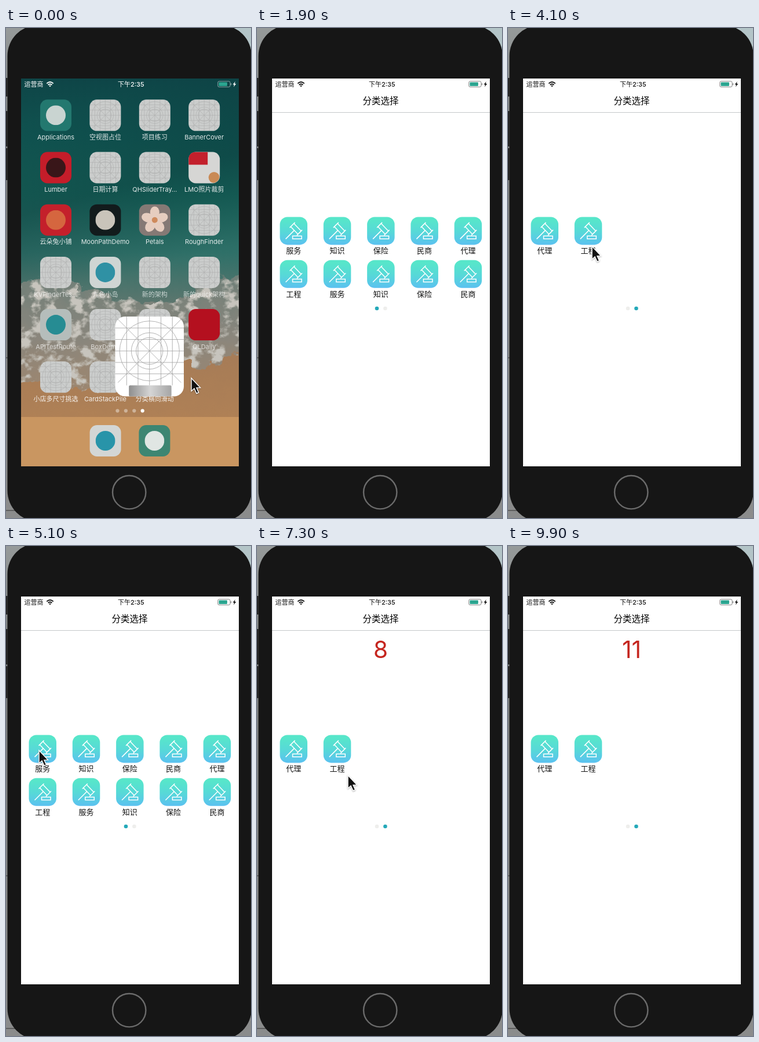
An HTML page for the animation above (10 s loop, 423x844 px).

```html
<!DOCTYPE html>
<html lang="zh">
<head>
<meta charset="utf-8">
<title>分类选择</title>
<style>
html, body { margin: 0; width: 100%; height: 100%; overflow: hidden; background: #161616; }
svg { display: block; width: 100vw; height: 100vh; }
text { font-family: Inter, "Noto Sans CJK SC", "Noto Sans CJK", sans-serif; text-anchor: middle; }
</style>
</head>
<body>
<svg id="stage" viewBox="0 0 423 844">
  <defs>
    <linearGradient id="wall" x2="0" y2="1">
      <stop offset="0" stop-color="#0e4547"/><stop offset=".15" stop-color="#105350"/>
      <stop offset=".3" stop-color="#176259"/><stop offset=".45" stop-color="#2f7068"/>
      <stop offset=".6" stop-color="#63776f"/>
    </linearGradient>
    <linearGradient id="shade" y2="1" x2=".3">
      <stop offset=".2" stop-color="#062c30" stop-opacity="0"/><stop offset=".6" stop-color="#062c30" stop-opacity=".3"/>
      <stop offset="1" stop-color="#062c30" stop-opacity="0"/>
    </linearGradient>
    <linearGradient id="foam" x2="0" y2="1">
      <stop offset="0" stop-color="#6f7f78"/><stop offset=".5" stop-color="#8a867c"/>
      <stop offset="1" stop-color="#a0866d"/>
    </linearGradient>
    <linearGradient id="sand" x2="0" y2="1">
      <stop offset="0" stop-color="#a57b58"/><stop offset="1" stop-color="#b98653"/>
    </linearGradient>
    <linearGradient id="mint" x2="0" y2="1">
      <stop offset=".1" stop-color="#57e6ca"/><stop offset=".55" stop-color="#57d8d8"/>
      <stop offset="1" stop-color="#5bc1f0"/>
    </linearGradient>
    <linearGradient id="metal">
      <stop offset="0" stop-color="#8e8e8e"/><stop offset=".5" stop-color="#d5d5d5"/>
      <stop offset="1" stop-color="#a5a5a5"/>
    </linearGradient>
    <linearGradient id="wallGrey" x2="0" y2="1">
      <stop offset="0" stop-color="#969a9a"/><stop offset=".25" stop-color="#777a7a"/>
      <stop offset=".6" stop-color="#828484"/><stop offset="1" stop-color="#8b8c8c"/>
    </linearGradient>
    <filter id="ragged">
      <feTurbulence type="fractalNoise" baseFrequency=".04" numOctaves="3" seed="4"/>
      <feDisplacementMap in="SourceGraphic" scale="34" xChannelSelector="R" yChannelSelector="G"/>
    </filter>
    <filter id="froth" color-interpolation-filters="sRGB">
      <feTurbulence type="fractalNoise" baseFrequency=".045 .06" numOctaves="5" seed="9" result="noise"/>
      <feColorMatrix values="0 0 0 0 .78  0 0 0 0 .77  0 0 0 0 .74  5 0 0 0 -2.35" result="flecks"/>
      <feDisplacementMap in="SourceGraphic" in2="noise" scale="34" xChannelSelector="R" yChannelSelector="G" result="shape"/>
      <feComposite in="flecks" in2="shape" operator="in"/>
    </filter>
    <clipPath id="screen"><rect x="26" y="87" width="376" height="668"/></clipPath>
    <g id="template" fill="none" stroke="#a2a2a2">
      <circle r=".195"/><circle r=".265"/><circle r=".435"/>
      <path d="M-.5 0H.5M0-.5V.5M-.5-.167H.5M-.5.167H.5M-.167-.5V.5M.167-.5V.5M-.5-.333H.5M-.5.333H.5M-.333-.5V.5M.333-.5V.5M-.46-.46L.46.46M-.46.46L.46-.46"/>
    </g>
    <g id="gavel">
      <rect width="47.5" height="48" rx="13" fill="url(#mint)"/>
      <path d="M10 38L24.5 23.5M17 18.5L26 9.5M29.5 31.5L38.5 22.5M19 17L31 29.5M24.5 11.5L36.5 24M22 32.8h15.5v5H22Z"
        fill="none" stroke="#fff" stroke-width="1.5"/>
    </g>
  </defs>

  <rect width="423" height="844" fill="url(#wallGrey)"/>
  <path d="M380 0H423V45Z" fill="#b3c4c7"/>
  <path d="M0 568H4M0 831H40" stroke="#333"/>
  <path d="M1 86V118M1 143V204M1 207V262" stroke="#202020" stroke-width="3"/>
  <rect x="2.5" y="-5" width="421.5" height="855" rx="53" fill="#161616"/>
  <circle cx="212.7" cy="799.7" r="28.7" fill="none" stroke="#6b6b6b" stroke-width="2.4"/>

  <g clip-path="url(#screen)">
    <g id="home">
      <rect x="26" y="87" width="376" height="668" fill="url(#wall)"/>
      <rect x="26" y="87" width="376" height="360" fill="url(#shade)"/>
      <path id="surf" d="M0 450Q60 420 105 436T190 462T270 470T340 440T430 436V640H0Z" fill="url(#foam)" filter="url(#ragged)"/>
      <use href="#surf" filter="url(#froth)"/>
      <path d="M0 606Q70 612 130 622T235 604T320 580T430 548V800H0Z" fill="url(#sand)" filter="url(#ragged)"/>
      <rect x="26" y="670" width="376" height="85" fill="#c99661"/>
      <g id="tiles"></g>
    </g>
    <g id="launch">
      <rect id="card" fill="#fff"/>
      <g id="cardArt">
        <use id="cardGrid" href="#template" stroke-width=".007"/>
        <rect id="cardBase" fill="url(#metal)"/>
      </g>
    </g>
    <g id="app">
      <rect x="26" y="87" width="376" height="668" fill="#fff"/>
      <g id="content">
        <text x="213.5" y="130.7" font-size="15.5" font-weight="500">分类选择</text>
        <path d="M26 145.5H402" stroke="#c4c8c9"/>
        <text id="count" x="213.5" y="193" font-size="40.5" fill="#c5261f"></text>
        <g id="pages"></g>
        <circle id="dot0" cx="207" cy="483" r="3.3"/>
        <circle id="dot1" cx="221.4" cy="483" r="3.3"/>
      </g>
    </g>
    <g id="status">
      <text x="48" y="100.7" font-size="11">运营商</text>
      <text x="215.8" y="100.5" font-size="11" font-weight="500">下午2:35</text>
      <path d="M70.3 95.6Q76 90.6 81.7 95.6M72.6 98Q76 95.2 79.4 98" fill="none" stroke="currentColor" stroke-width="1.9"/>
      <path d="M74.2 99.4Q76 98 77.8 99.4L76 101.6Z" fill="currentColor"/>
      <rect x="365.7" y="91.8" width="21.3" height="9.8" rx="2.4" fill="none" stroke="currentColor" stroke-opacity=".5"/>
      <rect x="367.4" y="93.4" width="14.5" height="6.6" rx="1" fill="#2ba590"/>
      <path d="M388.4 95.3v3" stroke="currentColor" stroke-opacity=".5" stroke-width="1.4"/>
      <path d="M395.8 92L391.6 97.6H394L393 101.6L397.3 96H394.8Z" fill="currentColor"/>
    </g>
  </g>
  <path id="cursor" d="M0 0V22.5L5 18L9 26.5L12.6 25L9 16.6H15.5Z" fill="#111" stroke="#fff" stroke-width="1.4"
    style="filter:drop-shadow(0 1px 1.2px #0005)"/>
</svg>
<script>
const LOOP = 10000, STEP = 100;
const $ = id => document.getElementById(id);
const set = (id, attrs) => { for (const k in attrs) $(id).setAttribute(k, attrs[k]); };
const label = (x, y, size, text, fill) =>
  `<text x="${x}" y="${y}" font-size="${size}" fill="${fill}">${text}</text>`;

// Tile art, drawn around the centre of the tile.
const disc = fill => `<circle r="17" fill="${fill}"/>`;
const blank = '<use href="#template" transform="scale(54)" stroke-width=".011" opacity=".75"/>';
const photo = '<path d="M-27-27H6V-5H-27Z" fill="#c3202c"/><circle cx="17" cy="17" r="9.5" fill="#c98a55"/>';
const blossom = [0, 72, 144, 216, 288].map(a =>
  `<ellipse cy="-13" rx="8" ry="10.5" fill="#e6cdbf" transform="rotate(${a})"/>`).join('') + '<circle r="5" fill="#cf8a5c"/>';

// Home screen: [label, tile colour, art]; no colour means a blank template.
const apps = [
  ['Applications', '#23786f', disc('#c9d4d1')], ['空视图占位'], ['项目练习'], ['BannerCover'],
  ['Lumber', '#c41d2a', disc('#391619')], ['日期计算'], ['QHSliderTray…'], ['LMO照片裁剪', '#d6d6d4', photo],
  ['云朵兔小铺', '#c4202b', disc('#d5663f')], ['MoonPathDemo', '#121b1c', disc('#c9c4ba')],
  ['Petals', '#857975', blossom], ['RoughFinder'],
  ['KVFinderTes…'], ['九色小岛', '#cfd5d3', disc('#2f91a4')], ['新的架构'], ['新的quick架构'],
  ['APITestRoute', '#b5bdbb', disc('#268c93')], ['BoxDemo'], [''], ['QLDaily', '#b4101f', ''],
  ['小店多尺寸挑选'], ['CardStackPile'], ['分类横向滑动']
];

function tile(x, y, colour = '#cbcdcc', art = blank) {
  return `<g transform="translate(${x + 27} ${y + 27})">
    <rect x="-27" y="-27" width="54" height="54" rx="12.5" fill="${colour}"/>
    <g style="clip-path:inset(0 round 12px)">${art}</g></g>`;
}

function buildHome() {
  let out = '';
  apps.forEach(([name, colour, art], i) => {
    const x = 59 + i % 4 * 85.4, row = Math.floor(i / 4), y = 123.3 + row * 90.2;
    out += tile(x, y, colour, art);
    out += label(x + 27, y + 68.7, 11, name, row > 2 && row < 5 ? '#ffffffb0' : '#ffffffe0');
  });
  for (let i = 0; i < 4; i++)
    out += `<circle cx="${192.5 + i * 14.4}" cy="659.3" r="3.1" fill="#fff" opacity="${i < 3 ? .4 : 1}"/>`;
  out += tile(144.6, 684, '#d3d6d5', disc('#2894a9')) + tile(229.4, 684, '#3d8672', disc('#e0e6e3'));
  $('tiles').innerHTML = out;
}

function buildPages() {
  const names = ['服务', '知识', '保险', '民商', '代理', '工程'];
  let out = '';
  for (let i = 0; i < 12; i++) {
    const slot = i % 10, x = 39.5 + slot % 5 * 75.3 + (i > 9 ? 376 : 0);
    const y = slot > 4 ? 399.7 : 325.4;
    // The second page carries on from the fifth name.
    const name = i > 9 ? names[i - 6] : names[i % 6];
    out += `<use href="#gavel" x="${x}" y="${y}"/>` + label(x + 23.7, y + 63, 13, name, '#111');
  }
  $('pages').innerHTML = out;
}

const smooth = p => p * p * (3 - 2 * p);

// Eased value from a track of [time, ...values].
function follow(track, t) {
  const i = track.findIndex(k => k[0] > t);
  if (i === 0) return track[0].slice(1);
  if (i < 0) return track[track.length - 1].slice(1);
  const a = track[i - 1], b = track[i], p = smooth((t - a[0]) / (b[0] - a[0]));
  return a.slice(1).map((v, n) => v + (b[n + 1] - v) * p);
}

const scrollTrack = [[3300, 0], [3900, 376], [4300, 376], [4800, 0], [6500, 0], [7100, 376]];
const cursorTrack = [
  [0, 320, 603], [300, 450, 600], [2400, 450, 420], [2800, 335, 385], [3300, 335, 385],
  [3800, 145, 376], [4200, 145, 376], [4600, 290, 372], [5100, 57, 352], [5300, 57, 352],
  [5800, 289, 420], [6200, 289, 424], [6500, 330, 405], [7000, 157, 395], [7400, 157, 395],
  [7800, 66, 352], [8200, 66, 352], [8600, 140, 352], [9000, 140, 352], [9500, 450, 420]
];
const taps = [[5300, '0'], [6000, '8'], [8000, '10'], [8800, '11']];

function drawLaunch(t) {
  const p = Math.sin(Math.min(t / 400, 1) * Math.PI / 2);
  const mix = (a, b) => a + (b - a) * p;
  const x = mix(188.5, 26), y = mix(497, 87), w = mix(118.5, 376), h = mix(137.5, 668);
  set('card', { x, y, width: w, height: h, rx: mix(17, 0) });
  set('cardArt', { opacity: Math.max(0, 1 - t / 250) });
  set('cardGrid', { transform: `translate(${x + w / 2} ${y + w / 2}) scale(${w})` });
  set('cardBase', { x: x + w * .2, y: y + w, width: w * .62, height: h - w, rx: 2 });
}

function draw(t) {
  const launching = t < 400;
  $('home').style.display = $('launch').style.display = launching ? '' : 'none';
  $('app').style.display = launching ? 'none' : '';
  if (launching) drawLaunch(t);
  $('content').style.display = t < 1000 ? 'none' : '';
  const ink = t < 300 ? '#fff' : '#111';
  set('status', { fill: ink, color: ink });

  const [scroll] = follow(scrollTrack, t);
  set('pages', { transform: `translate(${-scroll})` });
  const page = scroll > 188 ? 1 : 0;
  [0, 1].forEach(i => set('dot' + i, { fill: i === page ? '#25a9b9' : '#eeeeec' }));

  const tap = taps.filter(k => k[0] <= t).pop();
  $('count').textContent = tap ? tap[1] : '';
  set('cursor', { transform: `translate(${follow(cursorTrack, t).join(' ')})` });
}

buildHome();
buildPages();
const start = performance.now();
function tick() {
  const t = (performance.now() - start) % LOOP;
  draw(Math.floor(t / STEP) * STEP);
  requestAnimationFrame(tick);
}
tick();
</script>
</body>
</html>
```
